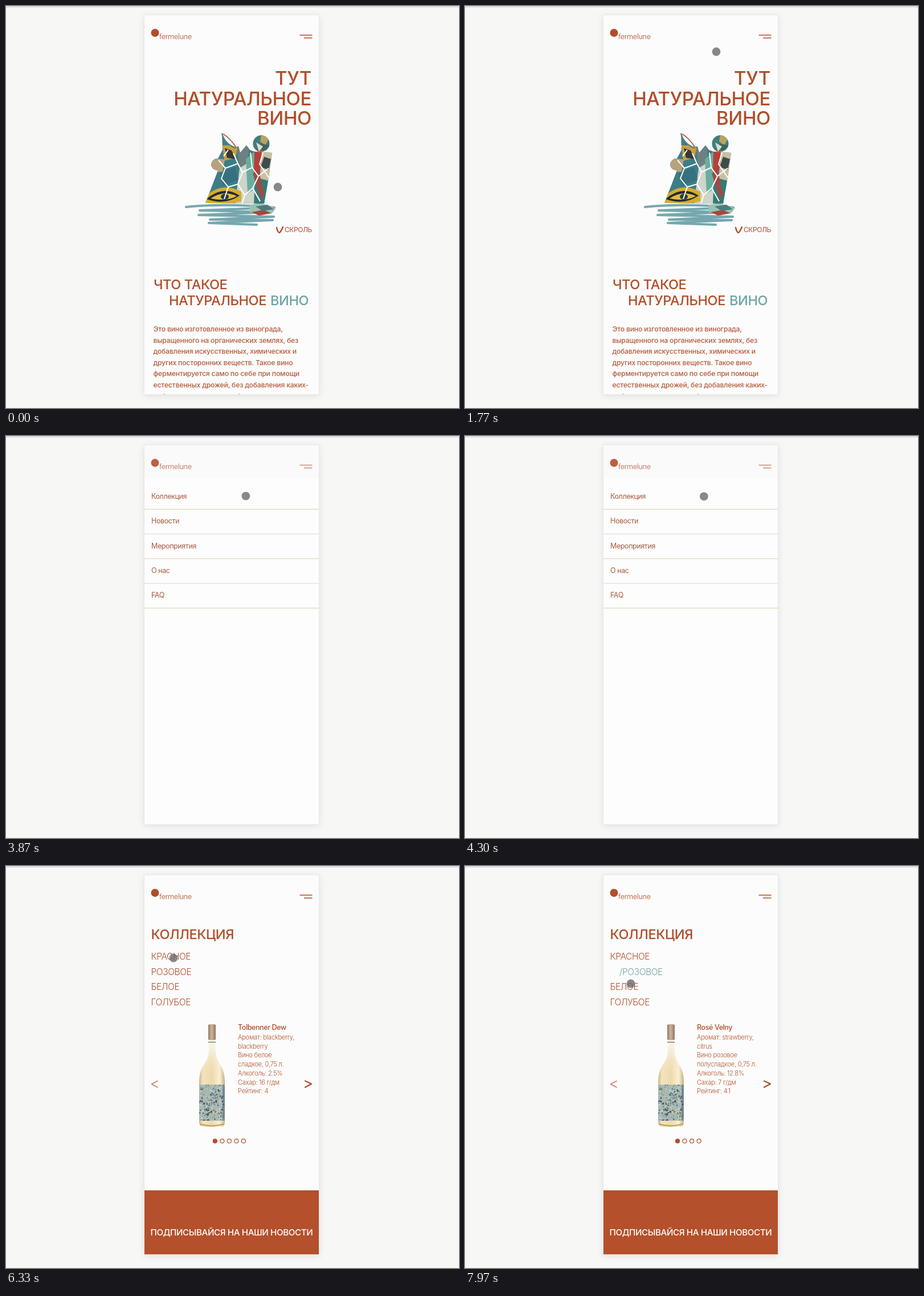
An HTML page that plays this animation: 795 px wide and 704 px high, repeating every 8 s.

```html
<!DOCTYPE html>
<html lang="ru">
<head>
<meta charset="utf-8">
<style>
  html, body { margin: 0; width: 100%; height: 100%; overflow: hidden; background: #f7f7f6; }
  svg { display: block; width: 795px; height: 704px; font-family: Inter, "Open Sans", sans-serif; letter-spacing: -.025em; }
  text { fill: #b04e2a; white-space: pre; }
  .card { filter: drop-shadow(0 2px 6px #0000001c); }
  .hero { font-size: 33px; font-weight: 500; text-anchor: end; }
  .title { font-size: 23.5px; font-weight: 500; }
  .body { font-size: 12.2px; letter-spacing: -.015em; font-weight: 500; fill: #b45c3c; }
  .menu { font-size: 12.5px; fill: #a95b40; }
  .filter { font-size: 15.5px; font-weight: 300; }
  .wine { font-size: 12.5px; font-weight: 500; }
  .detail { font-size: 11px; letter-spacing: -.02em; font-weight: 300; }
  .line { fill: none; stroke: #b04e2a; stroke-linecap: round; stroke-linejoin: round; }
</style>
</head>
<body>
<svg viewBox="0 0 795 704">
  <defs>
    <clipPath id="screen"><path d="M243 16H549V680H243Z"/></clipPath>
    <clipPath id="figure">
      <path d="M379 222Q385 241 402 247L408 246L411 257L422 244L428 252L436 255L467 257L461 300L453 346L350 345L372 288Q359 286 360 276Q364 266 372 267L380 252Z"/>
      <circle cx="448" cy="241" r="14.5"/>
    </clipPath>
    <clipPath id="label"><path d="M339 383H384V446H339Z"/></clipPath>
    <linearGradient id="glass">
      <stop stop-color="#cbb78d"/><stop offset=".14" stop-color="#f3e3bd"/>
      <stop offset=".5" stop-color="#eed9ab"/><stop offset=".8" stop-color="#faf0d6"/>
      <stop offset="1" stop-color="#c6b184"/>
    </linearGradient>
    <linearGradient id="empty" x2="0" y2="1">
      <stop stop-color="#fafaf6"/><stop offset=".35" stop-color="#f7f3e8" stop-opacity=".7"/>
      <stop offset="1" stop-color="#f3e3bd" stop-opacity="0"/>
    </linearGradient>
    <linearGradient id="cork">
      <stop stop-color="#927866"/><stop offset=".45" stop-color="#cfb59c"/><stop offset="1" stop-color="#8f7561"/>
    </linearGradient>
  </defs>

  <rect width="795" height="2.6" fill="#dadce1"/>
  <rect class="card" x="243" y="16" width="306" height="664" fill="#fcfcfc"/>
  <rect x="242.5" y="15.5" width="307" height="665" fill="none" stroke="#e8e8ea"/>

  <g clip-path="url(#screen)">
    <g id="home">
      <text class="hero" x="536" y="138">ТУТ</text>
      <text class="hero" x="536" y="174">НАТУРАЛЬНОЕ</text>
      <text class="hero" x="536" y="208">ВИНО</text>

      <path d="M316 352Q385 345 471 353L340 358L465 361L338 366L470 369L358 374L468 375L356 380L440 383" fill="none" stroke="#76a7ae" stroke-width="4.2" stroke-linejoin="round" stroke-linecap="round"/>
      <path d="M427 348L447 345L473 354L469 361L448 366L428 361Z" fill="#9dc0b3"/>
      <path d="M431 361L452 357L466 363L444 367Z" fill="#a9463a"/>
      <path d="M438 351L459 348L470 356L450 359Z" fill="#487e7a"/>
      <g clip-path="url(#figure)">
        <path d="M340 215H475V350H340Z" fill="#3c7e87"/>
        <path d="M380 244L407 244L403 266L383 271Z" fill="#caa03a"/>
        <path d="M358 265L384 269L380 291L358 289Z" fill="#b7a27e"/>
        <path d="M384 249L396 253L403 268L388 266Z" fill="#35373a"/>
        <path d="M405 244L426 246L424 282L410 287Z" fill="#6c8180"/>
        <path d="M410 284L432 270L440 349L402 346Z" fill="#cfd5cb"/>
        <path d="M421 268L437 254L440 319L424 328Z" fill="#67ae9f"/>
        <path d="M436 250L449 254L446 289L435 296Z" fill="#b64038"/>
        <path d="M449 253H469L464 310L445 306Z" fill="#c9c0a3"/>
        <path d="M453 264L465 268L461 287L447 282Z" fill="#3e4c4c"/>
        <path d="M437 300L461 306L456 347H435Z" fill="#347b77"/>
        <path d="M433 293L444 290L453 330L447 338Z" fill="#a04a47"/>
        <path d="M375 292L402 282L408 304L381 315Z" fill="#367180"/>
        <path d="M348 336Q376 306 413 325V342Q382 350 348 345Z" fill="#d6ac2d"/>
        <path d="M352 338Q381 313 410 332Q384 350 352 338Z" fill="#242a2e"/>
        <path d="M359 337Q382 322 405 333Q386 343 359 337Z" fill="#e2ba42"/>
        <ellipse cx="384" cy="334" rx="7" ry="5" fill="#263d47"/>
        <path d="M433 229L450 225L447 244L434 250Z" fill="#417e7e"/>
        <path d="M448 226L462 231L455 244L446 237Z" fill="#bca35d"/>
        <path d="M446 241L463 244L450 256Z" fill="#456158"/>
        <path d="M439 239L451 246L444 255Z" fill="#d2dfd5"/>
        <path d="M373 270L385 284L378 302L390 317L383 338M385 284L407 276L415 291L407 312L419 331L414 347M407 276L399 258M415 291L432 283L429 257M432 283L443 298L433 319L446 342M443 298L461 284M451 257L445 277L463 303M407 312L390 317M433 319L419 331M390 252L382 263" fill="none" stroke="#fff" stroke-width="2" stroke-linejoin="round"/>
      </g>
      <path d="M379 223Q383 241 403 249" fill="none" stroke="#547f85" stroke-width="2.2"/>
      <path d="M381 224Q394 232 404 248" fill="none" stroke="#b0644d" stroke-width="2"/>

      <path class="line" d="M475 388Q477 397 480 397Q482 396 486 387" stroke-width="2.4"/>
      <text x="537" y="396" font-size="12" text-anchor="end">СКРОЛЬ</text>
      <text class="title" x="259" y="496">ЧТО ТАКОЕ</text>
      <text class="title" x="286" y="524">НАТУРАЛЬНОЕ</text>
      <text class="title" x="464" y="524" style="fill:#6fa3a3">ВИНО</text>
      <g id="about"></g>
    </g>

    <g id="collection">
      <text class="title" x="254.5" y="128">КОЛЛЕКЦИЯ</text>
      <g id="filters"></g>
      <path d="M356 304H368V326Q369 339 377 350Q384 361 384 378V450Q384 457 374 457H349Q339 457 339 450V378Q339 361 346 350Q355 338 356 326Z" fill="url(#glass)"/>
      <path d="M356 304H368V326Q369 339 377 350L382 366H341L346 350Q355 338 356 326Z" fill="url(#empty)"/>
      <path d="M355 278Q361.500 276 368 278V304Q361.500 306 355 304Z" fill="url(#cork)"/>
      <path d="M355 308.500H368" stroke="#8d7c62" stroke-width="1.600"/>
      <path d="M341 452Q361 458 382 452" fill="none" stroke="#b79f5d" stroke-width="2"/>
      <g id="labelArt" clip-path="url(#label)"><path d="M339 383H384V446H339Z" fill="#a7b9b7"/></g>
      <path class="line" d="M266 376.500L255.500 382L266 387.500" stroke-width="1.300"/>
      <path class="line" d="M525 376.500L536 381.500L525 387.500" stroke-width="2.300"/>
      <g id="wine"></g>
      <path d="M243 568H549V680H243Z" fill="#b4502b"/>
      <text x="396" y="647" text-anchor="middle" style="fill:#fff;font-size:15.2px;font-weight:500">ПОДПИСЫВАЙСЯ НА НАШИ НОВОСТИ</text>
    </g>

    <g id="menu">
      <path d="M243 16H549V680H243Z" fill="#fdfdfd"/>
      <path d="M243 16H549V73H243Z" fill="#fafafa"/>
    </g>

    <g id="header">
      <circle cx="261.500" cy="47" r="7" fill="#b04e2a"/>
      <text x="269" y="57.500" font-size="12.8" font-weight="300">fermelune</text>
    </g>
    <path id="tap" d="M515.500 50H537.500V57H515.500Z" fill="#bdd6e8"/>
    <path id="burger" d="M515.500 51H537.500M523 56H537.500" stroke-width="1.700"/>
  </g>
  <circle id="cursor" r="7.400" fill="#606064" fill-opacity=".74"/>
</svg>

<script>
const $ = id => document.getElementById(id);
const label = (cls, x, y, content) => `<text class="${cls}" x="${x}" y="${y}">${content}</text>`;
const show = (id, on) => $(id).style.display = on ? "" : "none";

$("about").innerHTML = [
  "Это вино изготовленное из винограда,",
  "выращенного на органических землях, без",
  "добавления искусственных, химических и",
  "других посторонних веществ. Такое вино",
  "ферментируется само по себе при помощи",
  "естественных дрожей, без добавления каких-",
  "либо консервантов, сульфитов"
].map((line, i) => label("body", 258.5, 570 + i * 19.6, line)).join("");

$("menu").innerHTML += ["Коллекция", "Новости", "Мероприятия", "О нас", "FAQ"].map((item, i) => {
  const y = 110 + i * 43.25;
  const color = i % 2 ? "#ddd4df" : "#d9cda8";
  return label("menu", 255, y, item) + `<path d="M243 ${y + 18.3}H549" stroke="${color}"/>`;
}).join("");

$("filters").innerHTML = ["КРАСНОЕ", "РОЗОВОЕ", "БЕЛОЕ", "ГОЛУБОЕ"]
  .map((name, i) => label("filter", 254.5, 164 + i * 26.7, name)).join("");
const filters = [...$("filters").children];
const filterNames = filters.map(f => f.textContent);

function wineCard(name, lines, dots) {
  const circles = Array.from({ length: dots }, (_, i) =>
    `<circle class="line" cx="${391.8 + (i - (dots - 1) / 2) * 12.5}" cy="481.700" r="3.500" stroke-width="1.200" ${i ? "" : 'style="fill:#b04e2a"'}/>`);
  return label("wine", 407, 287, name)
    + lines.map((line, i) => label("detail", 407, 304 + i * 15.7, line)).join("") + circles.join("");
}
const wines = [
  wineCard("Tolbenner Dew", ["Аромат: blackberry,", "blackberry", "Вино белое", "сладкое, 0,75 л.",
    "Алкоголь: 2.5%", "Сахар: 16 г/дм", "Рейтинг: 4"], 5),
  wineCard("Rosé Velny", ["Аромат: strawberry,", "citrus", "Вино розовое", "полусладкое, 0,75 л.",
    "Алкоголь: 12.8%", "Сахар: 7 г/дм", "Рейтинг: 4.1"], 4)
];

// Speckled bottle label
let seed = 11;
const random = () => (seed = seed * 16807 % 2147483647) / 2147483647;
const speckles = ["#46627d", "#6e8fa6", "#d8ce9a", "#c7d5d6", "#84977f", "#3b4a5a", "#b9ad68"];
let art = "";
for (let i = 0; i < 240; i++) {
  const x = 339 + random() * 45, y = 383 + random() * 63;
  art += `<ellipse cx="${x}" cy="${y}" rx="${.7 + random() * 1.5}" ry="${.6 + random()}" transform="rotate(${random() * 180} ${x} ${y})" fill="${speckles[i % 7]}"/>`;
}
$("labelArt").innerHTML += art + '<path d="M380 383H384V446H380Z" fill="#46566f" opacity=".5"/>';

// time, x, y
const path = [
  [0, 477, 317], [700, 477, 317], [1650, 441, 80], [1800, 441, 80], [2350, 526, 49],
  [3100, 526, 49], [3750, 421, 105], [4500, 419, 106], [5100, 414, 197], [5350, 414, 197],
  [6200, 294, 161], [6700, 294, 161], [7150, 292, 185], [7500, 292, 185], [7950, 291, 206], [8000, 291, 206]
];
const clamp = v => Math.max(0, Math.min(1, v));
const smooth = v => v * v * (3 - 2 * v);

function cursorAt(t) {
  const next = path.findIndex(p => p[0] > t);
  const [t0, x0, y0] = path[next - 1], [t1, x1, y1] = path[next];
  const k = smooth((t - t0) / (t1 - t0));
  return [x0 + (x1 - x0) * k, y0 + (y1 - y0) * k];
}

const MENU_OPEN = 2480, PAGE_CHANGE = 4480, RED = 6500, ROSE = 7400;
let shownWine = -1;

function draw(t) {
  const onCollection = t >= PAGE_CHANGE;
  const menu = onCollection ? 0 : clamp((t - MENU_OPEN) / 250);
  show("home", !onCollection);
  show("collection", onCollection);
  $("menu").style.opacity = menu;
  $("header").style.opacity = 1 - .12 * menu;

  const tapped = t > MENU_OPEN - 60 && t < 3400;
  show("tap", tapped);
  $("burger").setAttribute("stroke", tapped ? "#4b5660" : "#b04e2a");
  $("burger").style.opacity = tapped ? 1 : 1 - .38 * menu;

  const selected = t >= ROSE ? 1 : t >= RED ? 0 : -1;
  filters.forEach((f, i) => {
    const on = i === selected;
    f.textContent = (on ? "/" : "") + filterNames[i];
    f.setAttribute("x", on ? 271 : 254.5);
    f.style.fill = on ? "#6fa3a3" : "";
  });
  const wine = t >= ROSE ? 1 : 0;
  if (wine !== shownWine) $("wine").innerHTML = wines[shownWine = wine];

  const [x, y] = cursorAt(t);
  $("cursor").setAttribute("cx", x);
  $("cursor").setAttribute("cy", y);
}

const start = performance.now();
function tick() {
  draw((performance.now() - start) % 8000);
  requestAnimationFrame(tick);
}
tick();
</script>
</body>
</html>
```
